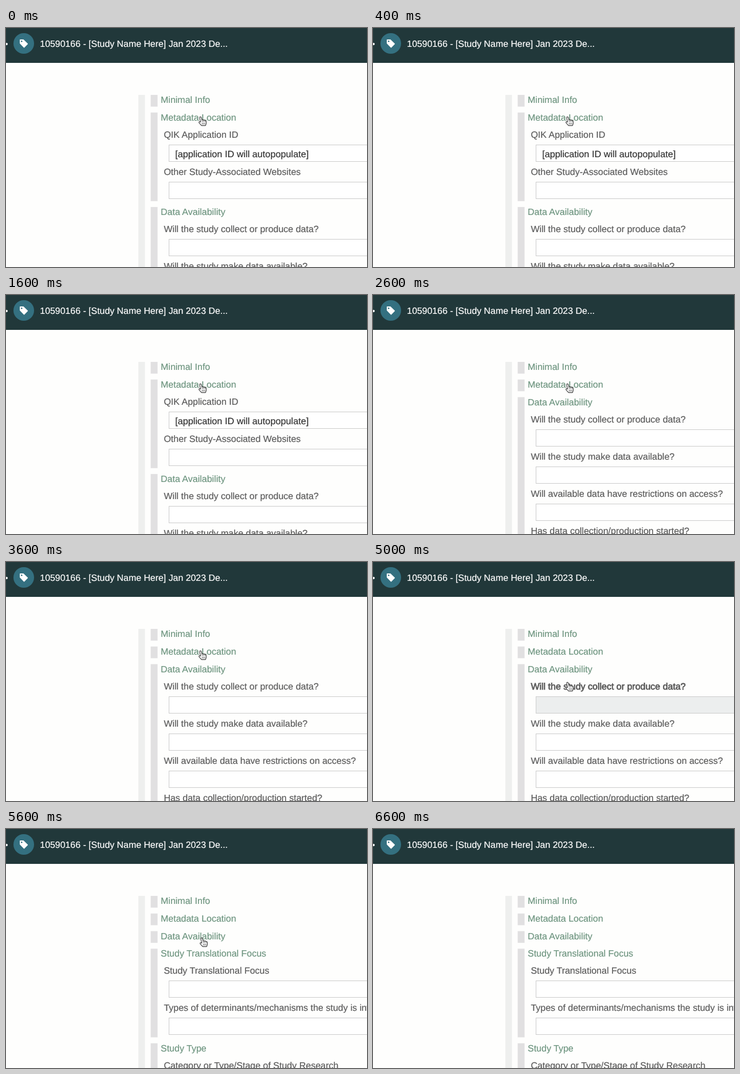
Write an HTML page that moves like this. It is 630 px wide and 418 px high and loops after 7 s.

```html
<!DOCTYPE html>
<html lang="en">
<head>
<meta charset="utf-8">
<title>Collapsible form</title>
<style>
  html, body { margin: 0; width: 100%; height: 100%; overflow: hidden; background: #fefefd; }
  svg { display: block; }
  text {
    font: 16px "Liberation Sans", Arial, Helvetica, sans-serif;
    fill: #5a5a5a; stroke: #5a5a5a; stroke-width: .2px;
    text-rendering: geometricPrecision;
  }
  .title { font-size: 15.9px; fill: #fff; stroke: #fff; }
  .heading { fill: #6d947f; stroke: #6d947f; }
  .value { font-size: 16.25px; fill: #333; stroke: #333; }
  .hover { stroke-width: .75px; }
</style>
</head>
<body>
<svg width="630" height="418" viewBox="0 0 630 418">
  <rect width="630" height="61" fill="#21383a"/>
  <circle cx="1" cy="28" r="2" fill="#fff"/>
  <circle cx="31" cy="27" r="18" fill="#347080"/>
  <path d="M24.8 20.8h5.4l7.2 7-5.8 5.8-6.8-7z" fill="#fff" stroke="#fff" stroke-width="1.6" stroke-linejoin="round"/>
  <circle cx="27.3" cy="23.2" r="1.3" fill="#347080"/>
  <text class="title" x="59.3" y="32.5">10590166 - [Study Name Here] Jan 2023 De...</text>
  <rect x="231" y="117" width="11.5" height="301" fill="#eeefee"/>
  <g id="form"></g>
  <g id="hand" stroke="#444" stroke-width="1.2" stroke-linejoin="round" stroke-linecap="round">
    <path fill="#fff" d="M-3.4 1.6L-5-5.6Q-5.2-7.4-4-7.6T-2.2-6.4L-1-2.2Q.6-3.2 1.6-1.8 3.2-2.6 4.2-1.2 6-1.6 6.4 .4V4L5.2 7.6H-1.8L-6 2.8Q-6.8 1-5.2.8Z"/>
    <path fill="none" stroke-width=".8" d="M-1-2.2L-.6 1M1.6-1.8V1M4.2-1.2V1M-.6 3V5.5M1.6 3V5.5M3.8 3V5.5"/>
  </g>
</svg>
<script>
const LOOP = 7000;
const form = document.getElementById("form");
const hand = document.getElementById("hand");

const groups = [
  ["Minimal Info"],
  ["Metadata Location", "QIK Application ID", "Other Study-Associated Websites"],
  ["Data Availability", "Will the study collect or produce data?", "Will the study make data available?",
    "Will available data have restrictions on access?", "Has data collection/production started?"],
  ["Study Translational Focus", "Study Translational Focus", "Types of determinants/mechanisms the study is interested in"],
  ["Study Type", "Category or Type/Stage of Study Research"]
];

// start time, first open group, pointer position, whether the first field is hovered
const steps = [
  [0, 1, 343, 163],
  [800, 2, 343, 163],
  [1600, 1, 343, 163],
  [2600, 2, 343, 163],
  [4400, 2, 344, 195],
  [5000, 2, 343, 218, true],
  [5200, 2, 344, 204],
  [5400, 2, 345, 198],
  [5600, 3, 345, 198],
  [6400, 3, -50, -50]
];

const label = (x, y, text, cls = "") => `<text x="${x}" y="${y + 5.5}" class="${cls}">${text}</text>`;

function field(name, y, hover, value) {
  return label(275.4, y, name, hover ? "hover" : "") +
    `<rect x="284.5" y="${Math.round(y + 17.5) + .5}" width="360" height="29" fill="${hover ? "#eceeee" : "#fff"}" stroke="#ccc"/>` +
    (value ? label(295.2, y + 34, value, "value") : "");
}

function drawForm(open, hover) {
  let y = 125.5, html = "";
  groups.forEach(([name, ...fields], i) => {
    const expanded = i >= open;
    const step = expanded ? 35.3 + 65 * fields.length : 30.8;
    html += `<rect x="252.5" y="${y - 8.5}" width="12" height="${step - 10.3}" fill="#e1e0e1"/>` + label(270, y, name, "heading");
    if (expanded) fields.forEach((text, k) => {
      html += field(text, y + 30 + 65 * k, hover && i === open && !k, i === 1 && !k && "[application ID will autopopulate]");
    });
    y += step;
  });
  form.innerHTML = html;
}

let shown;
function frame() {
  const t = performance.now() % LOOP;
  const step = steps.findLast(s => s[0] <= t);
  if (step !== shown) {
    const [, open, x, y, hover] = shown = step;
    drawForm(open, hover);
    hand.setAttribute("transform", `translate(${x} ${y})`);
  }
  requestAnimationFrame(frame);
}
frame();
</script>
</body>
</html>
```
